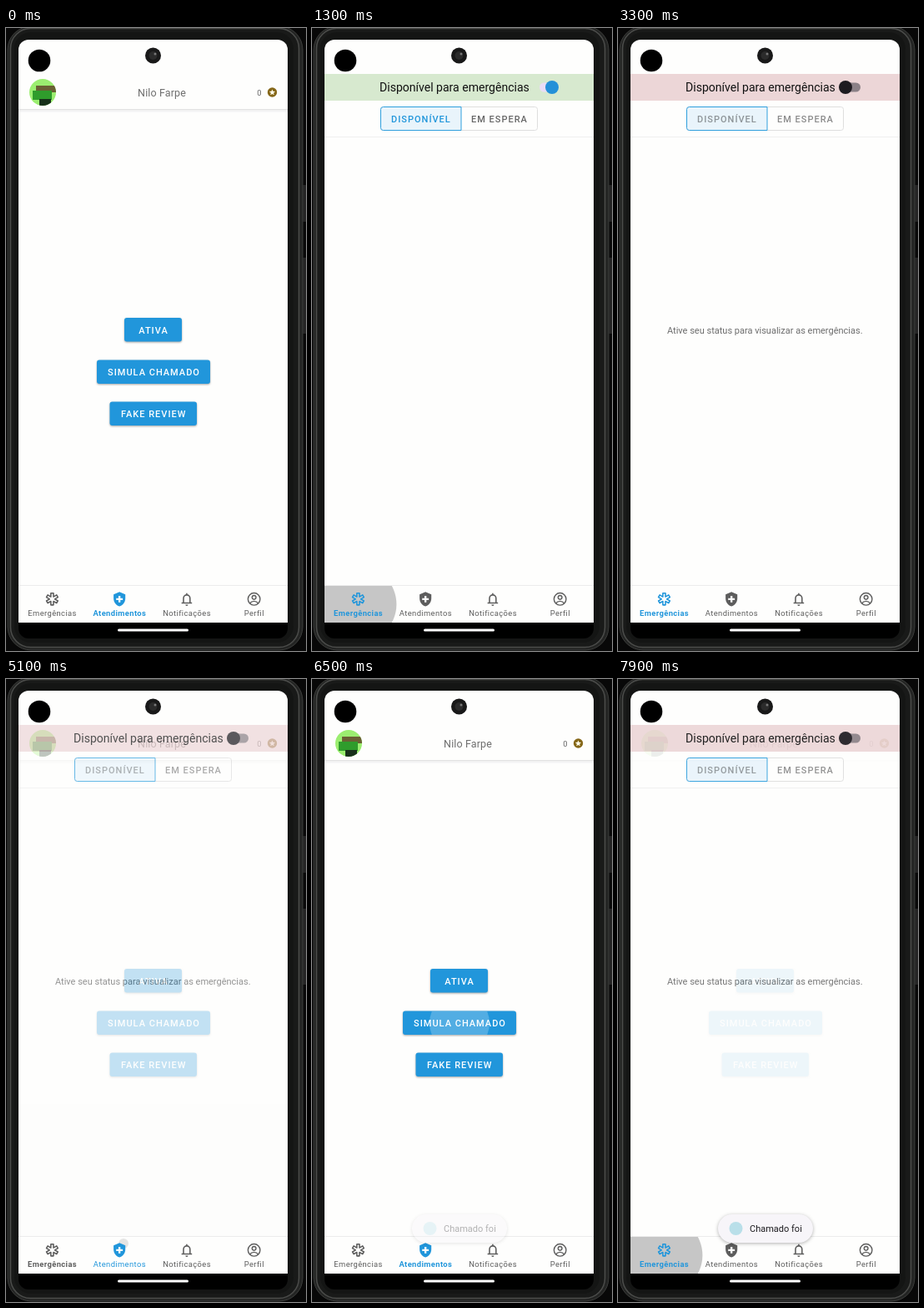
These frames come from a looping animation (360x746 px, 8 s). An HTML page:

```html
<!DOCTYPE html>
<html lang="pt">
<head>
<meta charset="utf-8">
<title>Atendimentos</title>
<style>
  html, body { margin: 0; width: 100%; height: 100%; overflow: hidden; background: #080808; }
  svg { display: block; width: 360px; height: 746px; }
  text { font-family: Roboto, sans-serif; }
  .btn rect { fill: #2196db; filter: drop-shadow(0 1px 1px rgba(0, 0, 0, .35)); }
  .caps { font-size: 11px; font-weight: 500; letter-spacing: 1px; }
  .btn text { fill: #fff; }
  .tab { fill: #5d5d5d; stroke: #5d5d5d; }
  .tab.on { fill: #2196db; stroke: #2196db; }
  .tab text { font-size: 9.4px; letter-spacing: .39px; stroke: none; text-anchor: middle; }
  .solid { stroke: none; }
  .line { fill: none; stroke-width: 2; stroke-linejoin: round; }
</style>
</head>
<body>
<svg viewBox="0 0 360 746">
  <defs>
    <clipPath id="screen"><path d="M15 712V26a12 12 0 0 1 12-12H326a12 12 0 0 1 12 12V712z"/></clipPath>
    <clipPath id="bar"><rect x="15" y="668" width="323" height="44"/></clipPath>
    <clipPath id="face"><circle cx="44" cy="77" r="16"/></clipPath>
    <clipPath id="press"><rect x="109" y="398" width="136" height="28" rx="3"/></clipPath>
  </defs>

  <!-- phone body -->
  <rect width="360" height="746" fill="#080808"/>
  <rect x="356" y="188" width="4" height="44" fill="#242424"/>
  <rect x="356" y="275" width="4" height="91" fill="#242424"/>
  <rect x="2" y="-2" width="354" height="747" rx="28" fill="#232423" stroke="#3d3e3c"/>
  <rect x="5.5" y=".5" width="346" height="741" rx="24" fill="#191a19" stroke="#4b4c4a" stroke-width="1.5"/>
  <rect x="10" y="5" width="335" height="731" rx="20" fill="#141514"/>
  <rect x="15" y="14" width="323" height="717" rx="12" fill="#000"/>

  <g clip-path="url(#screen)">
    <rect x="15" y="14" width="323" height="698" fill="#fefefd"/>

    <g id="home">
      <rect x="15" y="97" width="323" height="1.5" fill="#e2e2e2"/>
      <rect x="15" y="98.5" width="323" height="2" fill="#f4f4f4"/>
      <g clip-path="url(#face)">
        <rect x="28" y="61" width="32" height="32" fill="#9bee70"/>
        <rect x="36" y="69" width="24" height="8" fill="#6a6134"/>
        <rect x="32" y="75" width="23" height="11" fill="#2f9c2c"/>
        <rect x="40" y="85" width="14" height="8" fill="#17301a"/>
      </g>
      <text x="187" y="81.5" text-anchor="middle" font-size="12.5" letter-spacing=".12" fill="#6e6e6e">Nilo Farpe</text>
      <text x="304" y="80.5" text-anchor="middle" font-size="9.4" fill="#666">0</text>
      <circle cx="319.500" cy="77" r="5.700" fill="#846617"/>
      <path id="star" fill="#fffbe8"/>
      <g id="buttons"></g>
      <g clip-path="url(#press)"><circle id="splash" cx="177" cy="412" fill="#fff"/></g>
    </g>

    <g id="calls">
      <rect x="15" y="50" width="323" height="617" fill="#fefefd"/>
      <rect id="banner" x="15" y="55" width="323" height="32"/>
      <text x="81" y="76" font-size="14.050" fill="#111">Disponível para emergências</text>
      <rect id="track" y="65.500" width="23" height="11" rx="5.500"/>
      <circle id="thumb" cy="71" r="8"/>
      <rect x="82.500" y="94.500" width="188" height="28" rx="3" fill="#fefefd" stroke="#dedede"/>
      <path d="M179 94.500H85.500a3 3 0 0 0-3 3v22a3 3 0 0 0 3 3H179z" fill="#e9f4fb" stroke="#2f9fdd"/>
      <text id="free" class="caps" x="95" y="112.500">DISPONÍVEL</text>
      <text id="wait" class="caps" x="191" y="112.500">EM ESPERA</text>
      <rect x="15" y="130" width="323" height="1" fill="#efefef"/>
      <text id="hint" x="59" y="366" font-size="11" fill="#6c6c6c">Ative seu status para visualizar as emergências.</text>
    </g>

    <!-- tab bar -->
    <rect x="15" y="667" width="323" height="45" fill="#fefefd"/>
    <rect x="15" y="667" width="323" height="1" fill="#ececec"/>
    <g clip-path="url(#bar)"><circle id="ripple" fill="#000"/></g>
    <g id="tabs"></g>

    <g id="toast">
      <rect x="120" y="641" width="114" height="34" rx="17" fill="#f7f5f9" style="filter:drop-shadow(0 1px 2px rgba(0,0,0,.3))"/>
      <circle cx="141.500" cy="658" r="8" fill="#b9dfe9"/>
      <text x="158" y="662" font-size="11" fill="#1c1b1f">Chamado foi</text>
    </g>
  </g>

  <rect x="134" y="719.500" width="85" height="3" rx="1.500" fill="#fff"/>
  <circle cx="40" cy="39" r="13.300" fill="#000"/>
  <circle cx="176.500" cy="33" r="9.500" fill="#191919"/>
  <circle cx="176.500" cy="33" r="5" fill="#2b2b2b"/>
  <circle cx="179" cy="31" r="1.500" fill="#777"/>
</svg>

<script>
const LOOP = 8000, STEP = 100;
const $ = id => document.getElementById(id);
const set = (id, attrs) => {
  for (const k in attrs) $(id).setAttribute(k, attrs[k]);
};

// Linear interpolation through [time, value] pairs
function track(t, keys) {
  if (t <= keys[0][0]) return keys[0][1];
  for (let i = 1; i < keys.length; i++) {
    const [t0, v0] = keys[i - 1], [t1, v1] = keys[i];
    if (t <= t1) return v0 + (v1 - v0) * (t - t0) / (t1 - t0);
  }
  return keys[keys.length - 1][1];
}

const polar = (cx, cy, r, deg) => {
  const a = deg * Math.PI / 180;
  return (cx + r * Math.cos(a)).toFixed(2) + ' ' + (cy + r * Math.sin(a)).toFixed(2);
};

function starPath(cx, cy, r) {
  const pts = Array.from({ length: 10 }, (_, i) => polar(cx, cy, i % 2 ? r * .45 : r, i * 36 - 90));
  return 'M' + pts.join('L') + 'z';
}

// Six-armed medical sign: inner corner, then both corners of each arm
function asterisk(len, half) {
  const tip = Math.hypot(len, half), spread = Math.atan2(half, len) * 180 / Math.PI;
  const pts = [];
  for (let a = -90; a < 270; a += 60) {
    pts.push(polar(12, 12, half * 2, a - 30), polar(12, 12, tip, a - spread), polar(12, 12, tip, a + spread));
  }
  return 'M' + pts.join('L') + 'z';
}

const TABS = [
  ['Emergências', `<path class="line" d="${asterisk(9, 2)}"/>`],
  ['Atendimentos', `<path class="solid" fill-rule="evenodd" d="M12 1L3 5v6c0 5.550 3.840 10.740 9 12 5.160-1.260 9-6.450 9-12V5zM10.500 7h3v3.500h3.500v3h-3.500v3.500h-3v-3.500H7v-3h3.500z"/>`],
  ['Notificações', `<path class="line" d="M7 17.500V11a5 5.300 0 0 1 10 0v6.500M4 18h16M12 3v2"/><path class="solid" d="M10 20.500h4a2 2 0 0 1-4 0z"/>`],
  ['Perfil', `<g class="line" style="stroke-width:1.800"><circle cx="12" cy="12" r="9.300"/><circle cx="12" cy="9.500" r="3"/><path d="M5.800 18.300c3-4 9.400-4 12.400 0"/></g>`]
];
const tabX = i => 55.4 + 80.75 * i;

$('tabs').innerHTML = TABS.map(([label, icon], i) =>
  `<g class="tab"><g transform="translate(${tabX(i) - 9.4} 674.4) scale(.784)">${icon}</g>
   <text x="${tabX(i) + .2}" y="704">${label}</text></g>`).join('');
const tabs = [...$('tabs').children];

$('buttons').innerHTML = [
  ['ATIVA', 142, 347, 69], ['SIMULA CHAMADO', 109, 397.5, 136], ['FAKE REVIEW', 124.5, 447.5, 104.5]
].map(([label, x, y, w]) =>
  `<g class="btn"><rect x="${x}" y="${y}" width="${w}" height="28.500" rx="3"/>
   <text class="caps" x="${x + w / 2 + .5}" y="${y + 18.5}" text-anchor="middle">${label}</text></g>`).join('');
set('star', { d: starPath(319.5, 77.2, 3.8) });

const TAPS = [
  { at: 950, tab: 0, x: 52, y: 684 },
  { at: 5050, tab: 1, x: 141, y: 676 },
  { at: 7700, tab: 0, x: 52, y: 684 }
];

function drawTabs(t) {
  const tap = TAPS.filter(p => t > p.at).pop();
  const tab = tap ? tap.tab : 1;
  const dt = tap ? t - tap.at : LOOP;
  const shown = track(dt, [[0, 0], [50, .27], [150, .85], [250, 1]]);
  const bold = dt < 100 ? 1 - tab : tab;

  set('calls', { opacity: tab === 0 ? shown : 1 - shown });
  tabs.forEach((g, i) => {
    g.classList.toggle('on', i === tab);
    g.lastElementChild.setAttribute('font-weight', i === bold ? 700 : 400);
  });

  const go = track(dt, [[50, 0], [200, 1]]);
  const from = tap || { x: 0, y: 0 };
  set('ripple', {
    cx: from.x + (tabX(tab) - from.x) * go,
    cy: from.y + (690 - from.y) * go,
    r: track(dt, [[0, 0], [50, 6], [200, 46]]),
    opacity: track(dt, [[0, .06], [50, .1], [200, .22], [400, .22], [750, .025], [900, 0]])
  });
}

function drawStatus(t) {
  const off = t >= 2500;
  const slide = track(t, [[2000, 0], [2200, 1]]);
  set('banner', { fill: off ? '#ecd6d7' : '#d7e9cf' });
  set('track', { x: 273 - 5 * slide, fill: slide > .4 ? '#8b8187' : '#eadcf6' });
  set('thumb', { cx: 288 - 15 * slide, fill: slide > .4 ? '#1d1b20' : '#2490d8' });
  set('free', { fill: off ? '#8d9498' : '#2196db' });
  set('wait', { fill: off ? '#8b8b8b' : '#666' });
  set('hint', { opacity: off ? 1 : 0 });
}

function drawCall(t) {
  set('splash', {
    r: track(t, [[6300, 0], [6700, 72]]),
    opacity: track(t, [[6300, 0], [6400, .22], [6800, .22], [7300, 0]])
  });
  set('toast', { opacity: track(t, [[6400, 0], [6700, 1]]) });
}

function frame(now) {
  const t = Math.floor(now % LOOP / STEP) * STEP;
  drawTabs(t);
  drawStatus(t);
  drawCall(t);
}

const start = performance.now();
(function tick() {
  frame(performance.now() - start);
  requestAnimationFrame(tick);
})();
</script>
</body>
</html>
```
